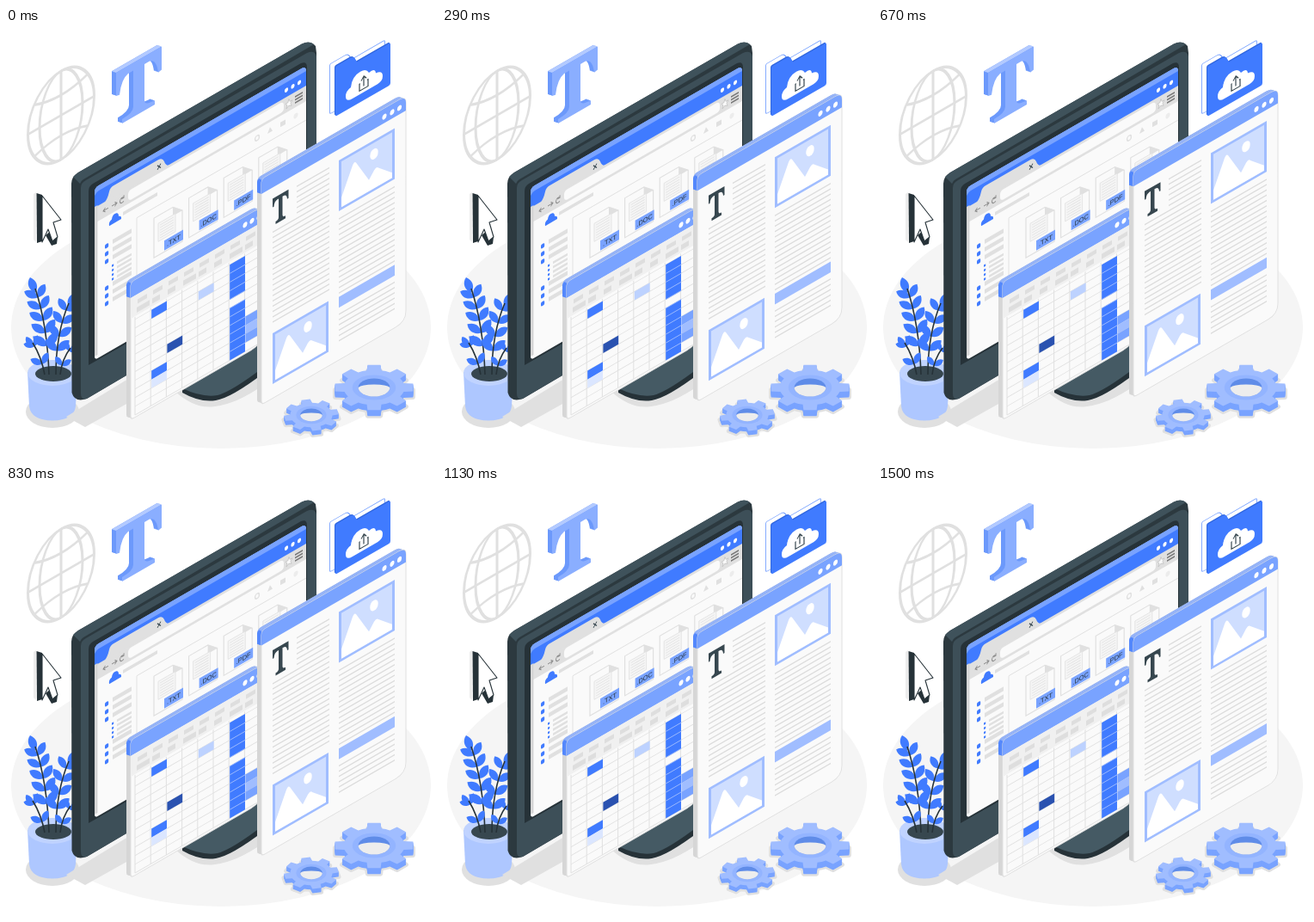
An HTML page that plays this animation: 500x500 px, repeating every 1540 ms.

```html
<!DOCTYPE html>
<html lang="en">
<head>
<meta charset="utf-8">
<title>Document editing</title>
<style>
html, body { margin: 0; width: 100%; height: 100%; overflow: hidden; background: #fff; }
svg { display: block; width: 100vw; height: 100vh; }
text { font-family: "Liberation Sans", Arial, sans-serif; }
</style>
</head>
<body>
<svg id="stage" viewBox="0 0 500 500" xmlns="http://www.w3.org/2000/svg"></svg>
<script>
const BLUE = '#407bff', MID = '#79a3ff', SOFT = '#a0bdff', PALE = '#cfdeff';
const GRAY = '#e0e0e0', PAPER = '#fafafa', DARK = '#263238', SLATE = '#37474f', STEEL = '#455a64';
const K = 0.577;

const path = (d, fill, extra = '') => `<path d="${d}" fill="${fill}" ${extra}/>`;
const line = (d, color, w, extra = '') =>
  `<path d="${d}" fill="none" stroke="${color}" stroke-width="${w}" ${extra}/>`;
const rect = (x, y, w, h, fill, extra = '') =>
  `<rect x="${x}" y="${y}" width="${w}" height="${h}" fill="${fill}" ${extra}/>`;
const oval = (x, y, rx, ry, fill, extra = '') =>
  `<ellipse cx="${x}" cy="${y}" rx="${rx}" ry="${ry}" fill="${fill}" ${extra}/>`;
const group = (x, y, body) => `<g transform="translate(${x} ${y})">${body}</g>`;
// Upright plane whose horizontals rise to the right
const plane = (x, y, body) => `<g transform="matrix(1 ${-K} 0 1 ${x} ${y})">${body}</g>`;
const repeat = (n, fn) => Array.from({ length: n }, (_, i) => fn(i)).join('');
// Copies stacked from back (up and left) to front
const extrude = (depth, body) => repeat(depth, i => group(i - depth, (i - depth) * .92, body));

function rounded(w, h, tl, tr, br, bl) {
  return `M0 ${tl}Q0 0 ${tl} 0H${w - tr}Q${w} 0 ${w} ${tr}V${h - br}Q${w} ${h} ${w - br} ${h}` +
    `H${bl}Q0 ${h} 0 ${h - bl}Z`;
}

// Thick window with a coloured title bar
function slab(x, y, w, h, bar, dots, body) {
  const sheet = rounded(w, h, 5, 8, 12, 4), head = rounded(w, bar, 5, 8, 0, 0);
  return plane(x, y,
    extrude(5, path(sheet, '#d6d6d6') + path(head, '#86abff')) +
    path(`M-5 0Q-4 -3 -2 -2L1 2L0 5V${bar}L-5 ${bar - 4.6}Z`, '#5488fc') +
    path(sheet, PAPER, `stroke="${GRAY}" stroke-width="1"`) +
    path(head, MID) +
    dots.map(d => oval(d, 9.6, 2.6, 3.1, '#fff')).join('') + body);
}

function globe() {
  const s = `stroke="${GRAY}" stroke-width="3"`;
  return plane(64, 101.5,
    oval(0, 0, 38.5, 51.5, 'none', s) + oval(0, 0, 25, 51.5, 'none', s) +
    line('M0-51V51M-38 0H38M-31-30Q0-17 31-30M-31 30Q0 17 31 30', GRAY, 3));
}

function letter() {
  const d = 'M0 0H53V27L49 28Q47 11 39 9H33V51Q33 58 45 58V63H7V58Q20 58 20 51V9H14Q6 11 4 28L0 27Z';
  return plane(128, 52,
    extrude(5, path(d, '#6c99fb')) +
    path('M-5 -4.6H48L53 0H0Z', '#b3caff') +
    path(d, '#8aaeff'));
}

function cursor() {
  return path('M32 193L35 191V249L32 246Z', '#ececec') +
    path('M35.500 192L42 194V248L36 250Z', DARK) +
    path('M46 241L52 236L60 243L59 251L53 253Z', DARK) +
    path('M42 195L64 223L55 226L60 243L54 248L49 234L42 249Z', '#fff',
      `stroke="${DARK}" stroke-width="1.1" stroke-linejoin="round"`);
}

function folder() {
  const s = `stroke="${MID}" stroke-width="0.9"`;
  const cover = 'M0 2Q0 0 2 0H18Q21 0 23 4L25 9H62Q64 9 64 11V56Q64 58 62 58H2Q0 58 0 56Z';
  const cloud = 'M20 44Q12 44 12 37Q12 31 18 30Q19 18 29 18Q36 18 39 25Q46 23 47 30Q55 31 55 38Q55 44 49 44Z';
  return plane(376.5, 42, path(cover, '#fff', s)) +
    plane(382, 44, path(cover, '#2f66df')) +
    plane(383, 45, path(cover, BLUE) +
      group(0, 4.5, path(cloud, '#fff') +
        line('M29 32H28V40H38V32H37M33 37V26M30 29.500L33 25.500L36 29.500', SLATE, 1.2)));
}

function leaf(x, y, angle, len) {
  const w = len * .34;
  return `<path transform="translate(${x.toFixed(1)} ${y.toFixed(1)}) rotate(${angle.toFixed(1)})" ` +
    `d="M0 0C${len * .3} ${-w} ${len * .75} ${-w} ${len} 0C${len * .7} ${w} ${len * .3} ${w} 0 0Z" fill="${BLUE}"/>`;
}

function branch(p, q, r, pairs, size) {
  let leaves = '';
  const at = (t, i) => (1 - t) ** 2 * p[i] + 2 * t * (1 - t) * q[i] + t * t * r[i];
  const slope = (t, i) => 2 * (1 - t) * (q[i] - p[i]) + 2 * t * (r[i] - q[i]);
  const heading = t => Math.atan2(slope(t, 1), slope(t, 0)) * 180 / Math.PI;
  for (let i = 0; i < pairs; i++) {
    const t = .3 + .58 * i / (pairs - 1), a = heading(t), len = size * (1.05 - .2 * t);
    leaves += leaf(at(t, 0), at(t, 1), a - 50, len) + leaf(at(t, 0), at(t, 1), a + 44, len);
  }
  return leaves + leaf(r[0], r[1] + 5, heading(1), size * .95) + line(`M${p}Q${q} ${r}`, DARK, 1.6);
}

function plant() {
  return oval(54, 446, 31, 19, GRAY) +
    path('M25 400L27 440Q29 456 54 456.500Q79 456 81 440L83 400Z', '#aec7ff') +
    oval(54, 401, 29, 15, '#c0d3ff') + oval(55, 402, 21, 9, SLATE) +
    branch([50, 403], [48, 345], [34, 303], 5, 20) +
    branch([58, 403], [58, 355], [73, 320], 4, 19) +
    branch([45, 403], [41, 382], [31, 366], 2, 15) +
    branch([63, 403], [65, 385], [75, 372], 2, 13);
}

function shell() {
  return path('M70 452L142 408V436L92 464Z', GRAY) +
    path('M196 422Q220 444 243 440Q268 437 298 416V395Z', GRAY) +
    path('M205 416V424Q226 436 244 433Q262 430 300 401V380Z', DARK) +
    path('M205 419Q228 430 246 427Q262 423 300 394V360Z', STEEL) +
    path('M76 181Q76 173 84 168L344 18.500Q354 14 360 21L361 29V274L94 431Q80 436 76.500 424Z', '#2c393f') +
    path('M78 173L84 168L344 18.500Q352 14.500 358 19L90 176Q87 178 86 181Z', '#3f525b') +
    path('M87 186Q87 180 93 177L350 29Q359 25 361 33V274L94 431Q87 433 87 425Z', '#3d4f58') +
    path('M96 190Q96 184 101 181L343 41Q350 38 350 46V248L96 392Z', DARK);
}

function doc(i) {
  const label = ['.TXT', '.DOC', '.PDF', ''][i];
  return group(i * 40.6, 0,
    path('M0 0H22L33 10V46H0Z', PAPER, `stroke="${GRAY}" stroke-width="1.2"`) +
    path('M22 0V10H33Z', GRAY) +
    rect(5, 9, 20, 21, '#f5f5f5', `stroke="${GRAY}" stroke-width="0.7"`) +
    repeat(6, n => line(`M7 ${12 + n * 3}H23`, GRAY, .8)) +
    (label ? rect(12, 33, 22, 11.5, MID) +
      `<text x="23" y="41.500" font-size="7.400" text-anchor="middle" fill="${DARK}">${label}</text>` : ''));
}

function browser() {
  const bullets = y => repeat(3, i => rect(12, y + i * 9, 4.2, 5, BLUE, 'rx="1.5"') +
    rect(21, y - 1 + i * 9, 22, 5, GRAY));
  const side = bullets(73) + bullets(122) +
    repeat(4, i => rect(20, 101 + i * 5.3, 2.2, 2.5, BLUE) +
      rect(26, 100.500 + i * 5.3, 17, 2.8, GRAY));
  return plane(103, 186,
    path(rounded(246, 200, 5, 6, 2, 4), PAPER) +
    path(rounded(246, 24, 5, 6, 0, 0), BLUE) +
    path('M0 5Q0 0 5 0H240Q246 0 246 6H5Q2 6 0 9Z', MID) +
    rect(0, 23, 246, 18, GRAY) + rect(0, 22, 3.5, 174, '#d6d6d6') +
    path('M11 24Q15 22 17 14Q18 10 22 10H74Q79 10 81 16Q83 23 88 24Z', GRAY) +
    line('M73 16L77 21M77 16L73 21', SLATE, 1) +
    rect(39, 26, 181, 12, PAPER, 'rx="4"') +
    [223, 230.5, 238].map(x => oval(x, 14.8, 2.1, 2.5, '#fff')).join('') +
    line('M16 32.500H10M12.500 30L10 32.500L12.500 35M20 32.500H26M23.500 30L26 32.500L23.500 35' +
      'M34 30.500Q30 28 29.500 33Q30 37 34 35M34 28V31H31', '#8a8a8a', 1) +
    line('M233 28.500H242M233 32H242M233 35.500H242', '#777', 1.7) +
    path('M226 27L227.200 30.500H230L228 33L229 36.500L226 34.500L223 36.500L224 33L222 30.500H224.800Z', PAPER,
      'stroke="#bbb" stroke-width="0.6"') +
    path('M17 54Q16 49 20 48Q21 42 25.500 44Q28 45 28 49Q31.500 50 31 54Z', BLUE) +
    rect(33, 47, 40, 4, GRAY) +
    oval(189, 51, 2.4, 2.8, 'none', `stroke="${GRAY}" stroke-width="1.4"`) +
    path('M201 53L204 47L207 53Z', GRAY) +
    rect(216, 48.5, 6, 5.5, GRAY) + oval(234, 51, 2.6, 2.9, '#ececec') +
    line('M49 63H246M49 63V186', GRAY, .9) + side +
    group(69, 75, repeat(4, doc)));
}

function table() {
  const c0 = 5, cw = 18.2, r0 = 45.8, rh = 10.1;
  const cell = (c, r, fill) => rect(c0 + 1 + c * cw, r0 + r * rh, cw - .4, rh, fill);
  const tools = repeat(8, i => rect(8 + i * 18, 24, 11, 5, '#dedede') +
    rect(i * 18 + 7, 33, i % 3 ? 9 : 15, 6, '#dedede'));
  const grid = repeat(12, i => line(`M${c0} ${r0 + i * rh}H152`, GRAY, .9)) +
    repeat(9, i => line(`M${c0 + i * cw} ${r0 - 3}V${r0 + 11 * rh}`, GRAY, 1));
  const cells = cell(1, 0, BLUE) + cell(4, 1, '#bdd2ff') + cell(2, 5, '#2a52b0') +
    cell(1, 7, BLUE) + cell(1, 8, '#dbe6ff') +
    repeat(11, r => r === 4 ? '' : cell(6, r, BLUE)) +
    cell(7, 7, MID) + cell(7, 8, SOFT) + cell(7, 9, MID) +
    repeat(10, i => line(`M${c0 + 6 * cw + 1} ${r0 + (i + 1) * rh}h${cw}`, SOFT, .7));
  return slab(145, 296, 152, 159.5, 18, [133, 141, 149],
    rect(0, 18, 152, 24, '#f0f0f0') + tools + grid + cells);
}

function photo(x, y) {
  return group(x, y,
    rect(1.5, 1.5, 62, 56, PALE, `stroke="${SOFT}" stroke-width="3"`) +
    path('M3 56V45L16 15Q18 11 20 14L35 43L41 35Q44 32 46 35L62 50V56Z', '#fff') +
    oval(41, 16, 4.7, 6, '#fff'));
}

function page() {
  const rows = (x, y, w, n) => repeat(n, i => line(`M${x} ${y + i * 6.15}h${w}`, '#dcdcdc', 1.5));
  const cap = 'M13 30H31.500V40H30Q29.500 34 25.500 34H24.500V55.500Q24.500 58.500 28 58.500V61.500H16.500V58.500Q20 58.500 20 55.500V34H19Q15 34 14.500 40H13Z';
  return slab(297, 176, 168, 262, 17, [143, 152, 160.5],
    path(cap, SLATE) + rows(41, 32, 38, 6) + rows(13, 69, 66, 18) +
    photo(90, 30) + rows(90, 98, 65, 15) +
    rect(90, 188.8, 65, 12.4, SOFT) + rows(90, 209, 65, 6) +
    photo(13, 186.5));
}

function gear(x, y, R, teeth, turn, depth) {
  const ring = [], step = 2 * Math.PI / teeth;
  const put = (a, r) => ring.push(`${(Math.cos(a) * r).toFixed(1)} ${(Math.sin(a) * r * K).toFixed(1)}`);
  for (let i = 0; i < teeth; i++) {
    const a = i * step + turn;
    put(a - step * .31, R * .77);
    put(a - step * .21, R);
    put(a + step * .21, R);
    put(a + step * .31, R * .77);
    put(a + step * .5, R * .77);
  }
  const d = 'M' + ring.join('L') + 'Z', h = R * .4, lip = depth - h * K;
  return group(x, y,
    group(0, depth, path(d, GRAY, `stroke="${GRAY}" stroke-width="5" stroke-linejoin="round"`)) +
    repeat(depth + 1, i => group(0, depth - i, path(d, i < depth ? MID : SOFT))) +
    oval(0, 0, R * .55, R * .55 * K, '#93b4ff') +
    oval(0, 0, h, h * K, '#5f8ce8') +
    path(`M${-h} 0Q${-h * .8} ${lip} 0 ${lip}Q${h * .8} ${lip} ${h} 0A${h} ${h * K} 0 0 1 ${-h} 0Z`, '#ededed'));
}

document.getElementById('stage').innerHTML =
  oval(250, 348, 244, 141, '#f5f5f5') +
  globe() + letter() + cursor() + plant() + shell() + browser() + table() + folder() +
  gear(355, 450, 32, 8, .58, 5) + gear(428, 418, 46, 8, 0, 7) +
  `<g id="page">${page()}</g>`;

const sheet = document.getElementById('page');
const LOOP = 1540, TICK = 1000 / 24, STEPS = 37, PEAK = 17, RISE = 10;

// The page rises and sinks at constant speed, 24 steps a second
function draw(ms) {
  const k = Math.floor((ms % LOOP + 5) / TICK) % STEPS;
  const gap = Math.abs(k - PEAK);
  const far = Math.min(gap, STEPS - gap);
  const y = RISE * (far - PEAK) / (STEPS / 2);
  sheet.setAttribute('transform', `translate(0 ${y.toFixed(2)})`);
}

const start = performance.now();
function loop() {
  draw(performance.now() - start);
  requestAnimationFrame(loop);
}
draw(0);
requestAnimationFrame(loop);
</script>
</body>
</html>
```
